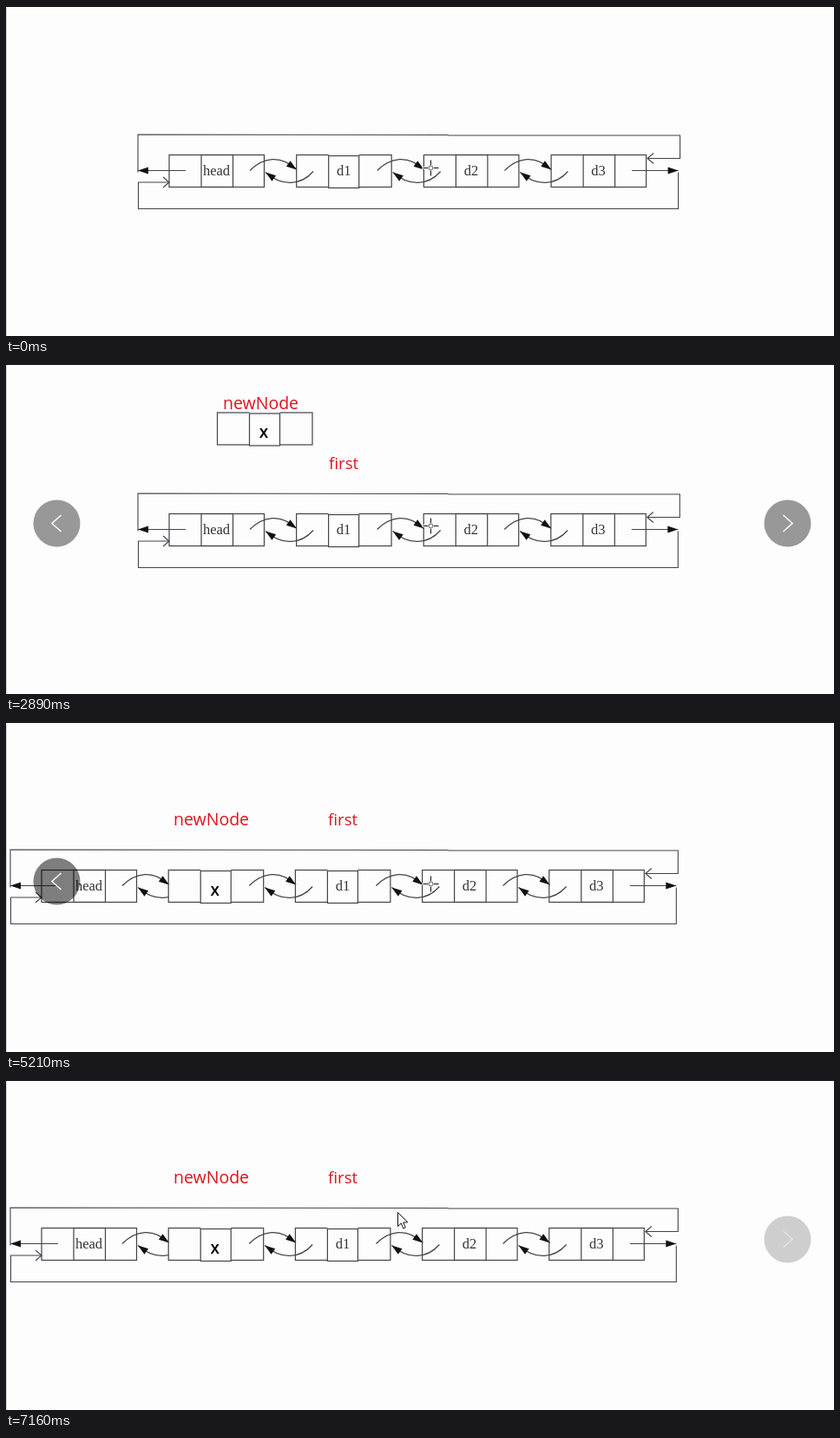
Write an HTML page with a canvas that moves like this. It is 954x380 px and loops after 7.44 s.

```html
<!DOCTYPE html>
<html lang="en">
<head>
<meta charset="utf-8">
<title>Linked list insertion</title>
<style>
  html, body { margin: 0; width: 100%; height: 100%; overflow: hidden; background: #fdfdfd; }
  canvas { display: block; }
</style>
</head>
<body>
<canvas id="stage" width="954" height="380"></canvas>
<script>
const g = document.getElementById('stage').getContext('2d');
const LOOP = 7440, BG = '#fdfdfd', INK = '#42424c', RED = '#dc1420';
const SANS = '"Open Sans", "Noto Sans", sans-serif';
const SERIF = '"Liberation Serif", "Noto Serif", serif';

function path(points, color = INK, width = 1.1) {
  g.beginPath();
  points.forEach(([x, y]) => g.lineTo(x, y));
  g.strokeStyle = color;
  g.lineWidth = width;
  g.stroke();
}

function text(str, x, y, size, color, family = SANS, align = 'left', weight = 400) {
  g.font = `${weight} ${size}px ${family}`;
  g.textAlign = align;
  g.fillStyle = color;
  g.fillText(str, x, y);
}

const caption = (str, x, y, size) => text(str, x, y, size, RED, SANS, 'left', 500);

// Solid arrow head with its tip at x, y
function head(x, y, angle) {
  g.save();
  g.translate(x, y);
  g.rotate(angle);
  g.beginPath();
  g.moveTo(0, 0);
  g.lineTo(-12, -4);
  g.lineTo(-12, 4);
  g.fillStyle = '#111';
  g.fill();
  g.restore();
}

// Open arrow head pointing along dir (1 right, -1 left)
function openHead(x, y, dir) {
  path([[x - 7 * dir, y - 6], [x, y], [x - 7 * dir, y + 6]]);
}

function arc(x1, y1, cx1, cy1, cx2, cy2, x2, y2, angle) {
  g.beginPath();
  g.moveTo(x1, y1);
  g.bezierCurveTo(cx1, cy1, cx2, cy2, x2, y2);
  g.strokeStyle = INK;
  g.lineWidth = 1.2;
  g.stroke();
  head(x2, y2, angle);
}

function links(x, y) {
  arc(x + 93, y + 18, x + 108, y + 3, x + 128, y - 1, x + 147, y + 17, 0.62);
  arc(x + 166, y + 19, x + 152, y + 35, x + 130, y + 37, x + 111, y + 20, Math.PI + 0.62);
}

function node(label, x, y) {
  const shifted = label === 'x' || label === 'd1';
  g.strokeStyle = INK;
  g.lineWidth = 1.2;
  if (label === 'x') {
    g.fillStyle = BG;
    g.fillRect(x, y, 109.5, 37);
  }
  g.strokeRect(x, y, 109.5, 37);
  if (shifted) {
    g.fillStyle = BG;
    g.fillRect(x + 37, y - 1, 35, 39);
    g.strokeRect(x + 37, y + 1, 35, 37);
  } else {
    g.strokeRect(x + 37, y, 36.5, 37);
  }
  if (label === 'x') text('x', x + 53.5, y + 29, 19, '#000', SANS, 'center', 600);
  else text(label, x + 54.5, y + 23, 16.5, '#333', SERIF, 'center');
}

function chain(labels, x0, y, pitch) {
  const last = x0 + (labels.length - 1) * pitch;
  const left = x0 - 36, right = last + 148.5;
  labels.forEach((label, i) => {
    const x = x0 + i * pitch;
    if (i) links(x - pitch, y);
    node(label, x, y);
  });
  path([[left, y + 20], [left, y - 23.5], [509, y - 23], [510, y - 22.5],
    [right, y - 22.5], [right, y + 4], [last + 111, y + 4]]);
  openHead(last + 111, y + 4, -1);
  path([[x0 + 19, y + 18], [left, y + 18]]);
  head(left, y + 18, Math.PI);
  path([[x0, y + 31.5], [left + .5, y + 31.5], [left + .5, y + 62],
    [right - 2, y + 62], [right - 2, y + 20]]);
  openHead(x0, y + 31.5, 1);
  path([[last + 93, y + 18], [right - 2, y + 18]]);
  head(right - 2, y + 18, 0);
}

function button(x, dir, alpha, shade = .4) {
  if (alpha <= 0) return;
  g.globalAlpha = alpha;
  g.beginPath();
  g.arc(x, 183.5, 27, 0, 7);
  g.fillStyle = `rgba(0,0,0,${shade})`;
  g.fill();
  path([[x - 5 * dir, 174], [x + 5.5 * dir, 183.5], [x - 5 * dir, 193]], '#fafafa', 1.6);
  g.globalAlpha = 1;
}

function crosshair(x, y) {
  for (const [color, width, from, to] of [[BG, 3, 0, 10], ['#111', 1, 3, 9]]) {
    for (const [dx, dy] of [[1, 0], [-1, 0], [0, 1], [0, -1]])
      path([[x + dx * from, y + dy * from], [x + dx * to, y + dy * to]], color, width);
  }
  g.strokeStyle = '#555';
  g.lineWidth = .7;
  g.strokeRect(x - 2, y - 2, 4, 4);
}

function pointer(x, y) {
  g.beginPath();
  [[0, 0], [0, 16], [3.8, 12.5], [6.4, 18.5], [8.8, 17.4], [6.2, 11.6], [11.3, 11.3]]
    .forEach(([dx, dy]) => g.lineTo(x + dx + .5, y + dy + .5));
  g.closePath();
  g.fillStyle = '#fff';
  g.fill();
  g.strokeStyle = '#111';
  g.lineWidth = 1;
  g.stroke();
}

const ramp = (t, from, to) => Math.min(1, Math.max(0, (t - from) / (to - from)));

function draw(t) {
  g.fillStyle = BG;
  g.fillRect(0, 0, 954, 380);
  g.fillStyle = '#d0d0d0';
  g.fillRect(0, 0, 1, 380);
  g.fillStyle = '#000';
  g.fillRect(0, 0, 954, 1);

  const list = ['head', 'd1', 'd2', 'd3'];
  const inserted = t >= 4720;
  if (t < 1340) {
    chain(list, 188, 171.5, 146.7);
  } else if (t < 2810) {
    chain(list, 187.5, 169.5, 146.5);
    caption('first = head->next', 337, 120, 20.5);
  } else if (!inserted) {
    chain(list, 188, 172.5, 146.6);
    node('x', 243.5, 56);
    caption('newNode', 250, 52, 19.5);
    caption('first', 372, 121, 18.7);
  } else {
    chain(['head', 'x', 'd1', 'd2', 'd3'], 41, 170.5, 146.2);
    caption('newNode', 193, 119, 19.5);
    caption('first', 371, 119, 18.7);
  }

  const fade = ramp(t, 6100, 6790);
  if (t >= 1340) {
    button(58.5, -1, 1 - fade, inserted ? .5 : .4);
    button(900.5, 1, inserted ? .47 * fade : 1);
  }

  if (t < 6140) {
    crosshair(489.5, 186.5);
  } else {
    const glide = ramp(t, 6140, 6790);
    const nudge = t >= 6870 ? 1 : 0;
    const rise = ramp(t, 7040, 7160);
    pointer(489 - 38 * glide, 186 - 23 * glide - nudge - 10 * rise);
  }
}

const start = performance.now();
function frame() {
  draw((performance.now() - start) % LOOP);
  requestAnimationFrame(frame);
}
frame();
</script>
</body>
</html>
```
